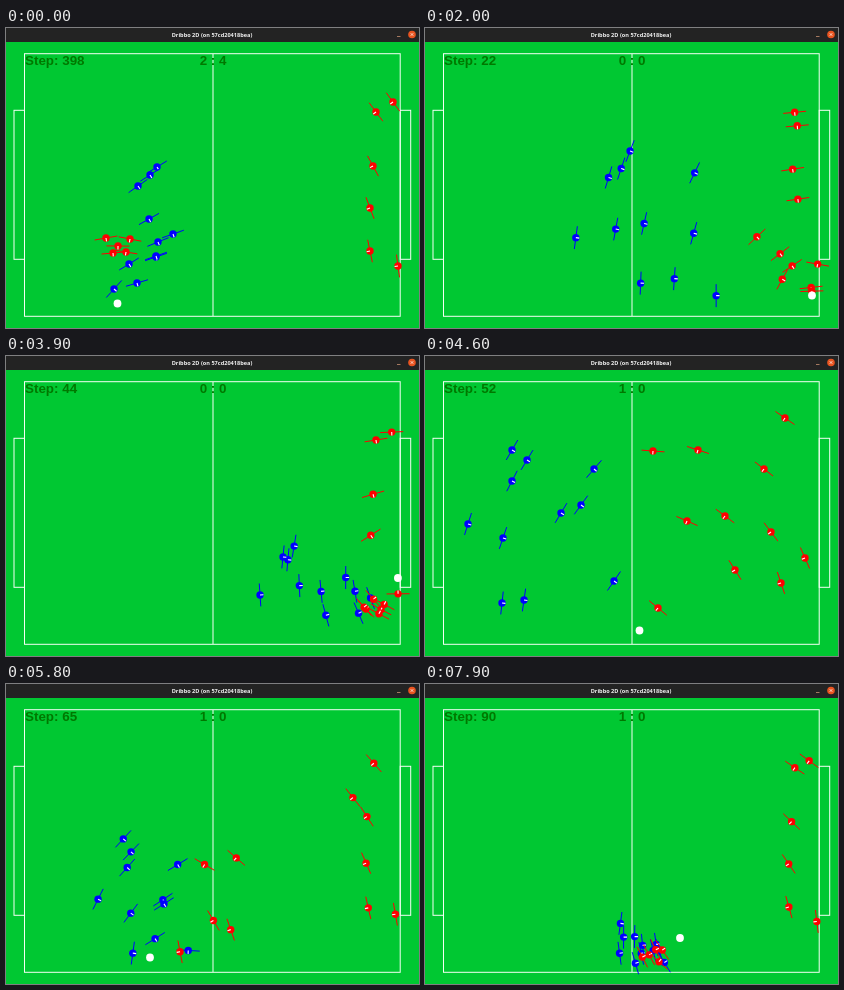
An HTML page with a canvas that plays this animation: 413 by 300 pixels, repeating every 8 s.

```html
<!DOCTYPE html>
<html lang="en">
<head>
<meta charset="utf-8">
<title>Football simulation</title>
<style>
html, body { margin: 0; width: 100%; height: 100%; overflow: hidden; background: #00c832; }
canvas { display: block; }
</style>
</head>
<body>
<canvas id="stage" width="413" height="300"></canvas>
<script>
const ctx = document.getElementById('stage').getContext('2d');
const LOOP = 8000, TICK = 100;
const BLUE_SPEED = 5.7, RED_SPEED = 7.6, GUARD_SPEED = 5.5;

const points = (...list) =>
  Array.from({ length: list.length / 2 }, (_, i) => ({ x: list[2 * i], y: list[2 * i + 1] }));

// Posts of the red guards; the first `guards` players of a round hold them.
const posts = points(370,84, 387,74, 367,138, 364,180, 392,238, 364,223);

// Each round is known at one tick; the rules below play it on and back from there.
const rounds = [
  {
    from: 0, known: 0, score: '2 : 4', guards: 6,
    blue: points(151,139, 144,147, 132,158, 143,191, 167,206, 152,214, 150,229, 150,228, 123,236, 131,255, 108,261),
    red: [...posts, ...points(100,210, 124,211, 112,218, 107,225, 120,224)]
  },
  {
    from: 1, known: 11, score: '0 : 0', guards: 5,
    blue: points(165,91, 155,110, 139,124, 235,107, 173,173, 142,185, 102,194, 223,182, 199,241, 165,247, 240,271),
    red: points(369,85, 348,137, 369,148, 392,152, 394,232, 366,227, 291,154, 311,175, 331,182, 317,213, 361,251)
  },
  {
    from: 41, known: 46, score: '1 : 0', guards: 6,
    blue: points(87,94, 102,104, 87,125, 169,113, 156,149, 136,157, 43,168, 78,182, 189,225, 77,247, 99,244),
    red: points(360,62, 300,160, 339,113, 346,176, 380,202, 356,227, 273,94, 228,95, 310,214, 262,165, 233,252)
  }
];

// Ball and step counter: tick, x, y, step.
const track = [
  [0, 111.5, 275.5, 398], [1, 207, 157, 1], [11, 394.3, 288, 12], [20, 387, 267.5, 22],
  [30, 337, 285, 34], [40, 398, 215, 45], [41, 207, 157, 46], [46, 214.5, 274.5, 52],
  [58, 144, 273.5, 65], [75, 245, 287, 85], [79, 255, 254, 90]
];

const mix = (a, b, p) => a + (b - a) * p;

function ballAt(tick) {
  let i = track.length - 2;
  while (track[i][0] > tick) i--;
  const a = track[i], b = track[i + 1], p = (tick - a[0]) / (b[0] - a[0]);
  return { x: mix(a[1], b[1], p), y: mix(a[2], b[2], p), step: Math.round(mix(a[3], b[3], p)) };
}

// Chasers gather round the ball, each at a place of its own.
function placeAt(ball, i) {
  const a = i * 2.4, r = 6 + i;
  return { x: ball.x + r * Math.cos(a), y: Math.min(288, ball.y + r * Math.sin(a)) };
}

// Walk towards a goal at full speed and ease in when close.
function walk(p, goal, speed, ticks = 1) {
  const dx = goal.x - p.x, dy = goal.y - p.y, d = Math.hypot(dx, dy) || 1;
  const s = Math.min(speed, .12 * d) / d * ticks;
  return { x: p.x + dx * s, y: p.y + dy * s };
}

function advance(teams, ball, guards, ticks) {
  return {
    blue: teams.blue.map((p, i) => walk(p, placeAt(ball, i), BLUE_SPEED, ticks)),
    red: teams.red.map((p, i) => i < guards
      ? walk(p, posts[i], GUARD_SPEED, ticks)
      : walk(p, placeAt(ball, i - guards), RED_SPEED, ticks))
  };
}

const frames = [];
rounds.forEach((round, n) => {
  const { from, known, guards } = round;
  const end = n + 1 < rounds.length ? rounds[n + 1].from : LOOP / TICK;
  for (let k = from; k < known; k++) {
    frames[k] = advance(round, ballAt(known), guards, k - known);
  }
  frames[known] = round;
  for (let k = known + 1; k < end; k++) {
    frames[k] = advance(frames[k - 1], ballAt(k), guards, 1);
  }
});

function line(x1, y1, x2, y2, color, width = 1) {
  ctx.strokeStyle = color;
  ctx.lineWidth = width;
  ctx.beginPath();
  ctx.moveTo(x1, y1);
  ctx.lineTo(x2, y2);
  ctx.stroke();
}

function disc(x, y, r, color) {
  ctx.fillStyle = color;
  ctx.beginPath();
  ctx.arc(x, y, r, 0, 7);
  ctx.fill();
}

function label(text, x, y, font, color, align = 'left') {
  ctx.font = font;
  ctx.fillStyle = color;
  ctx.textAlign = align;
  ctx.fillText(text, x, y);
}

function drawField() {
  ctx.fillStyle = '#00c832';
  ctx.fillRect(0, 0, 413, 300);
  ctx.strokeStyle = '#f4fff4';
  ctx.lineWidth = 1;
  ctx.strokeRect(18.5, 25.7, 375.7, 262.6);
  ctx.strokeRect(8, 82.3, 10.5, 149);
  ctx.strokeRect(394.2, 82.3, 10.5, 149);
  line(207, 26, 207, 288, '#f4fff4');
}

function drawBar() {
  ctx.fillStyle = '#232323';
  ctx.fillRect(0, 0, 413, 14);
  label('Dribbo 2D (on 57cd20418bea)', 206, 9, 'bold 5.6px "Open Sans", sans-serif', '#f2f2f2', 'center');
  line(391, 8.5, 394.5, 8.5, '#c79070', .8);
  disc(406, 6.5, 3.8, '#e95420');
  line(404.7, 5.2, 407.3, 7.8, '#fff', .7);
  line(407.3, 5.2, 404.7, 7.8, '#fff', .7);
}

// Arms stretch across the facing: red looks at the ball, blue half-way between ball and goal.
function drawPlayer({ x, y }, ball, color, attention) {
  const facing = Math.atan2(ball.y - y, ball.x - x) * attention;
  const c = Math.cos(facing), s = Math.sin(facing);
  line(x + 11.5 * s, y - 11.5 * c, x - 11.5 * s, y + 11.5 * c, color);
  disc(x, y, 3.7, color);
  line(x, y, x + 3.4 * c, y + 3.4 * s, '#fff', 1.1);
}

function draw(now) {
  const tick = Math.floor(now % LOOP / TICK);
  const ball = ballAt(tick), { blue, red } = frames[tick];
  const { score } = rounds.findLast(r => r.from <= tick);
  const font = 'bold 13.4px "Liberation Sans", Arial, sans-serif';

  drawField();
  label('Step: ' + ball.step, 19, 37, font, '#007800');
  label(score, 193.7, 37, font, '#007800');
  blue.forEach(p => drawPlayer(p, ball, '#00f', .55));
  red.forEach(p => drawPlayer(p, ball, '#f00', 1));
  disc(ball.x, ball.y, 3.9, '#fff');
  drawBar();
}

const start = performance.now();
function loop() {
  draw(performance.now() - start);
  requestAnimationFrame(loop);
}
loop();
</script>
</body>
</html>
```
